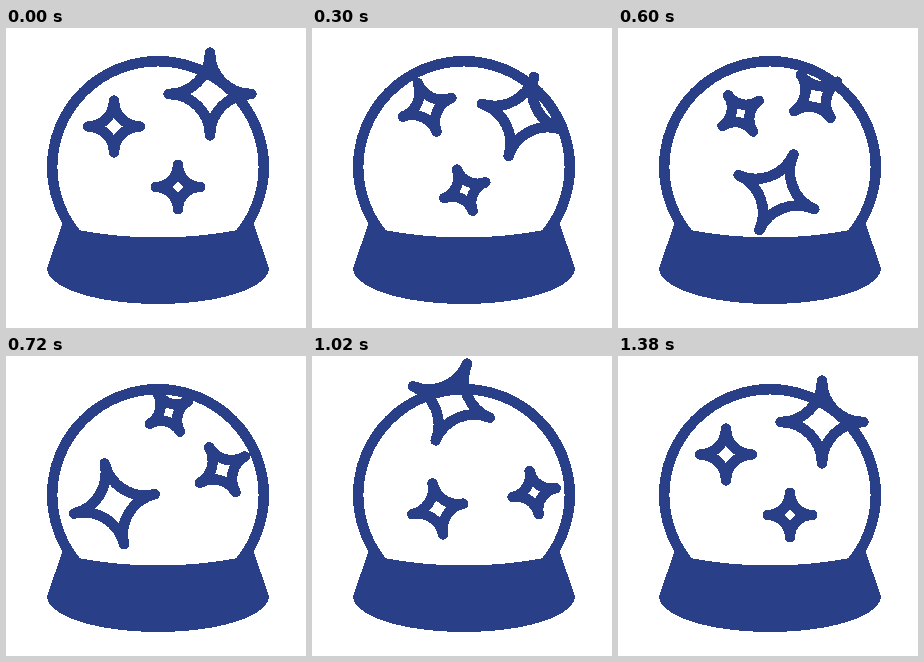
Write an HTML page that moves like this. It is 300 by 300 pixels and loops after 1.56 s.

```html
<!DOCTYPE html>
<html lang="en">
<head>
<meta charset="utf-8">
<title>Crystal ball</title>
<style>
  html, body { margin: 0; width: 100%; height: 100%; overflow: hidden; background: #fff; }
  svg { display: block; width: 100vw; height: 100vh; }
</style>
</head>
<body>
<svg viewBox="0 0 300 300" fill="none" stroke="#293f87" stroke-width="10.5" stroke-linejoin="round" shape-rendering="crispEdges">
  <circle cx="152" cy="139" r="105.8"/>
  <path d="M57 194L41 240A111 36 0 0 0 263 240L247 194L232 202Q152 217 72 202Z" fill="#293f87" stroke="none"/>
  <g id="stars"></g>
</svg>
<script>
const LOOP = 1560, STEP = 60, START = 120, END = 1380;

// Each star circles its hub once; drift widens the orbit while under way.
const stars = [
  { size: 41.5, rest: [204, 66], hub: [150, 105], drift: [-3.5, 7], spins: true },
  { size: 26, rest: [108, 98.5], hub: [161, 110], drift: [0, -5] },
  { size: 22, rest: [172, 159], hub: [172, 112], drift: [-4, 9] }
];

for (const star of stars) {
  const s = star.size, arc = `A${s} ${s} 0 0 0 `;
  star.node = document.createElementNS("http://www.w3.org/2000/svg", "path");
  star.node.setAttribute("d", `M0 ${-s}${arc}${s} 0${arc}0 ${s}${arc}${-s} 0${arc}0 ${-s}Z`);
  document.getElementById("stars").append(star.node);
}

function draw(now) {
  const time = Math.floor(now % LOOP / STEP) * STEP;
  const t = Math.min(1, Math.max(0, (time - START) / (END - START)));
  const turn = 180 * (1 - Math.cos(Math.PI * t));
  const swell = 1 - (2 * t - 1) ** 4;
  const sway = -35 * Math.sin(Math.PI * t ** 0.65) ** 2;
  for (const { node, rest, hub, drift, spins } of stars) {
    const [x, y] = rest.map((r, i) => r - hub[i] + swell * drift[i]);
    const tilt = spins ? 0 : sway - turn;
    node.setAttribute("transform",
      `translate(${hub}) rotate(${turn}) translate(${x} ${y}) rotate(${tilt})`);
  }
}

const begin = performance.now();
function tick() {
  draw(performance.now() - begin);
  requestAnimationFrame(tick);
}
tick();
</script>
</body>
</html>
```
